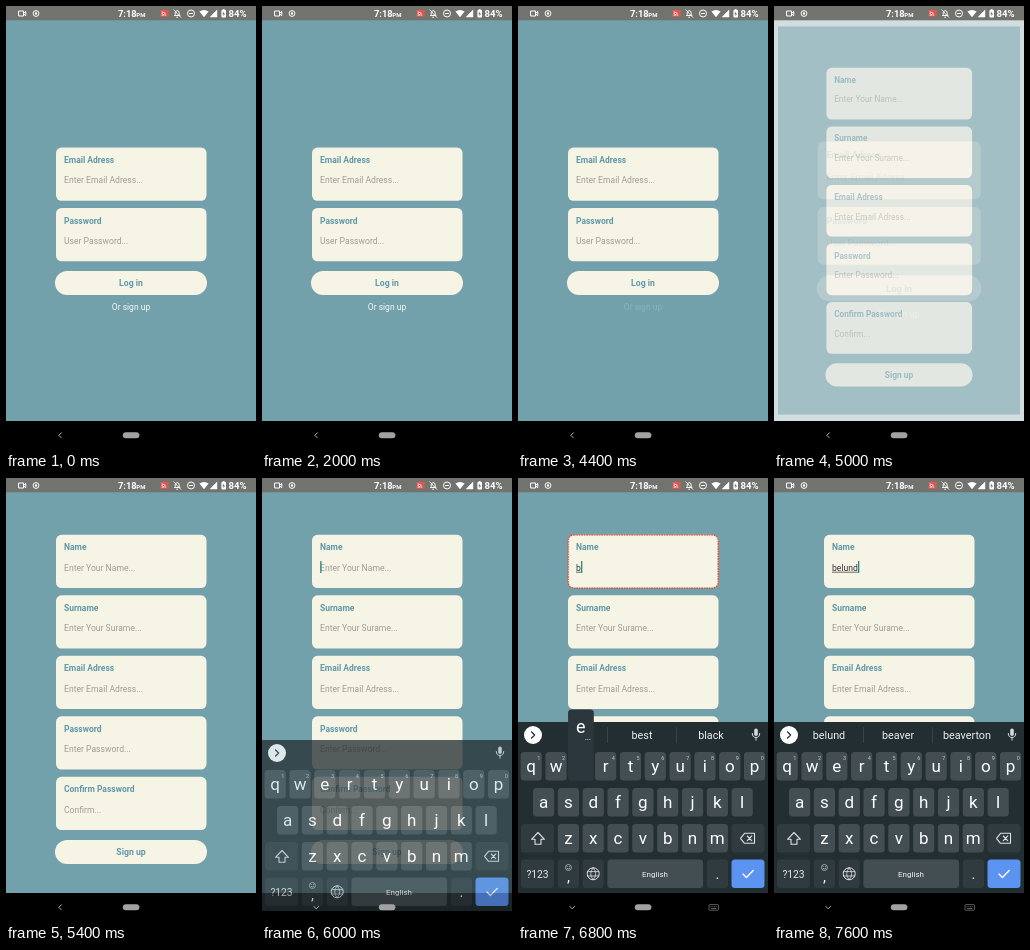
These frames come from a looping animation (250 px wide and 444 px high, 8 s). An HTML page:

```html
<!DOCTYPE html>
<html lang="en">
<head>
<meta charset="utf-8">
<title>Sign up flow</title>
<style>
  html, body { margin: 0; width: 100%; height: 100%; overflow: hidden; background: #000; }
  svg { display: block; width: 100vw; height: 100vh; font-family: Roboto, sans-serif; }
</style>
</head>
<body>
<svg id="stage" viewBox="0 0 250 444"></svg>
<script>
const LOOP = 8000, STEP = 200;
const TEAL = '#72a0ab', CREAM = '#f6f4e4', LABEL = '#6298a9', HINT = '#a09f95';
const CURSOR = '#2b8587', BOARD = '#232e32', KEY = '#434e52', DARK_KEY = '#303b3f';
const stage = document.getElementById('stage');

const rect = (x, y, w, h, fill, r = 0, extra = '') =>
  `<rect x="${x}" y="${y}" width="${w}" height="${h}" rx="${r}" fill="${fill}" ${extra}/>`;
const text = (str, x, y, size, fill, extra = '') =>
  `<text x="${x}" y="${y}" font-size="${size}" fill="${fill}" ${extra}>${str}</text>`;
const line = (d, color = '#fff', width = 1) =>
  `<path d="${d}" fill="none" stroke="${color}" stroke-width="${width}" stroke-linecap="round" stroke-linejoin="round"/>`;
const shape = (d, fill = '#fff') => `<path d="${d}" fill="${fill}"/>`;
const circle = (x, y, r, fill, extra = '') => `<circle cx="${x}" cy="${y}" r="${r}" fill="${fill}" ${extra}/>`;
const group = (content, opacity, transform = '') =>
  `<g opacity="${opacity}" transform="${transform}">${content}</g>`;
const zoom = s => `translate(125 214.5) scale(${s}) translate(-125 -214.5)`;
const MID = 'text-anchor="middle"', BOLD = 'font-weight="700"';

// --- Forms ---
const backdrop = rect(0, 14, 250, 401, TEAL);

const field = (top, label, hint) =>
  rect(50, top, 150.5, 53.3, CREAM, 5.5) +
  text(label, 58, top + 15.5, 8.5, LABEL, BOLD) +
  (hint ? text(hint, 58, top + 35.7, 8.6, HINT) : '');

const button = (top, label) =>
  rect(49, top, 152, 24, CREAM, 12) + text(label, 125, top + 15.1, 8.7, LABEL, `${BOLD} ${MID}`);

const loginScreen = linkOpacity => backdrop +
  field(141.5, 'Email Adress', 'Enter Email Adress...') +
  field(202, 'Password', 'User Password...') +
  button(265, 'Log in') +
  text('Or sign up', 125, 303.7, 8.5, '#f7f8f5', `${MID} opacity="${linkOpacity}"`);

function signupScreen({ typed = '', focused = false }) {
  const fields = [
    ['Name', typed ? '' : 'Enter Your Name...'],
    ['Surname', 'Enter Your Surame...'],
    ['Email Adress', 'Enter Email Adress...'],
    ['Password', 'Enter Password...'],
    ['Confirm Password', 'Confirm...']
  ];
  let out = backdrop + button(362, 'Sign up');
  fields.forEach(([label, hint], i) => out += field(56.8 + i * 60.5, label, hint));
  if (typed) out += text(typed, 58, 92.5, 8.6, '#333');
  const end = 58 + textWidth(typed);
  if (typed) out += rect(58, 93.8, end - 58, .7, '#333');
  if (typed && typed.length < 3) {
    out += rect(50.2, 57, 150, 53, 'none', 5.5, 'stroke="#e2422f" stroke-width="1.2" stroke-dasharray="1.8 .7"');
  }
  if (focused) out += rect(end + .2, 83, 1.3, 12, CURSOR);
  return out;
}

const ruler = document.createElement('canvas').getContext('2d');
function textWidth(str) {
  ruler.font = '86px Roboto, sans-serif';
  return ruler.measureText(str).width / 10;
}

// --- Keyboard ---
const ROWS = [['qwertyuiop', 13.2, 274], ['asdfghjkl', 25.6, 310], ['zxcvbnm', 50.4, 346]];
const PITCH = 24.82;

const keyCap = (x, y, w, fill) => rect(x, y, w, 28.5, fill, 3.5);

function popup(letter) {
  const [row, first, top] = ROWS.find(([letters]) => letters.includes(letter));
  const x = first + row.indexOf(letter) * PITCH;
  return rect(x - 12.8, top - 42.5, 25.8, 71.5, '#2b373c', 3.5) +
    text(letter, x, top - 19.5, 18, '#fff', MID) +
    [5, 7, 9].map(dx => circle(x + dx, top - 12.5, .55, '#dfe3e4')).join('');
}

function keyboard({ words = [], pressed }) {
  let out = rect(0, 244, 250, 171, BOARD);
  out += circle(15, 257, 9, '#fff') + line('M13.6 254 l3 3 -3 3', '#27343a', 1.3);
  words.forEach((word, i) => out += text(word, 55 + i * 69, 261, 10.8, '#eceff0', MID));
  if (words.length) out += rect(89, 249, .6, 16, '#465156') + rect(158.3, 249, .6, 16, '#465156');
  out += rect(236.2, 250.5, 3.6, 7.5, '#d5d9da', 1.8) + line('M234.3 255.5 a3.7 4 0 0 0 7.4 0 M238 259.6 v2.6', '#d5d9da', 1);

  for (const [letters, first, top] of ROWS) {
    [...letters].forEach((letter, i) => {
      const x = first + i * PITCH;
      out += keyCap(x - 10.6, top, 21.2, KEY) + text(letter, x, top + 19.6, 17, '#fff', MID);
      if (top === 274) out += text((i + 1) % 10, x + 7.6, 281.5, 5.5, '#c3c9cb', MID);
    });
  }
  out += keyCap(3, 346, 33, DARK_KEY) + line('M20 354.5 l-6.5 6.8 h3.5 v5 h6 v-5 h3.5 z', '#dde1e2', 1.1);
  out += keyCap(213.5, 346, 33, DARK_KEY) +
    line('M222.5 360.3 l4 -5 h10 v10 h-10 z M229.3 358 l4.4 4.6 m0 -4.6 l-4.4 4.6', '#dde1e2', 1.1);

  out += keyCap(3, 381.5, 33, DARK_KEY) + text('?123', 19.5, 399.7, 10.3, '#e4e7e8', MID);
  out += keyCap(39.8, 381.5, 21.2, DARK_KEY) + text(',', 50.4, 403.5, 15, '#fff', MID) +
    circle(50.4, 389.5, 3, 'none', 'stroke="#c3c9cb" stroke-width=".7"') +
    line('M48.9 390.3 q1.5 1.8 3 0 M49.3 388.6 v.1 M51.5 388.6 v.1', '#c3c9cb', .7);
  out += keyCap(64.6, 381.5, 21.2, DARK_KEY) + circle(75.2, 395.8, 6, 'none', 'stroke="#dde1e2"') +
    line('M69.6 393.6 h11.2 M69.6 398 h11.2 M75.2 389.8 q-5.2 6 0 12 q5.2 -6 0 -12', '#dde1e2', .8);
  out += keyCap(89.4, 381.5, 95.7, KEY) + text('English', 137, 398.8, 8, '#eef0f1', MID);
  out += keyCap(188.8, 381.5, 21.2, DARK_KEY) + text('.', 199.4, 400.5, 15, '#fff', MID);
  out += keyCap(213.5, 381.5, 33, '#5b93f0') + line('M225 396 l3.4 3.4 6.8 -7', '#fff', 1.4);
  return out + (pressed ? popup(pressed) : '');
}

// --- System bars ---
const statusBar = rect(0, 0, 250, 14.3, '#71736f') +
  line('M13 5 h4.6 v5 h-4.6 z M17.8 7.1 l2 -1.6 v4.2 l-2 -1.6') +
  circle(30, 7.5, 2.9, 'none', 'stroke="#fff"') + circle(30, 7.5, 1.2, '#fff') +
  text('7:18', 112, 10.7, 9.3, '#fff', 'font-weight="600"') +
  text('PM', 130.3, 10.7, 6, '#fff', 'font-weight="600"') +
  rect(154.5, 3.8, 8.2, 7, '#d95a50', .8) + line('M156 9.4 h.4 M156 7.6 q1.8 0 1.8 1.8 M156 5.8 q3.6 0 3.6 3.6', '#fff', .8) +
  line('M168.5 9.5 h5.4 M169.2 9.3 v-2.4 a2 2.2 0 0 1 4 0 v2.4 M167.8 3.8 l6.8 7.4 M170.7 11.2 h1', '#fff', .9) +
  circle(185, 7.5, 3.5, 'none', 'stroke="#fff"') + line('M183.4 7.5 h3.2') +
  shape('M193.4 5.6 q4.6 -3.4 9.2 0 l-4.6 5.7 z') +
  shape('M211.2 3.4 v7.8 h-7.6 z') +
  rect(215.4, 4.1, 4.6, 7.5, '#fff', .8) + rect(216.7, 3.2, 2, 1, '#fff') + shape('M218 5.4 l-1.7 2.8 h1.2 v2 l1.6 -2.8 h-1.1 z', '#71736f') +
  text('84%', 222.5, 10.8, 9.6, '#fff', 'font-weight="600"');

function navIcons(keyboardOpen, switcher) {
  let out = rect(116.8, 426.3, 16.6, 6, '#a2a2a2', 3);
  out += keyboardOpen ? line('M51.8 428.4 l2.4 2.4 2.4 -2.4', '#b5b5b5') : line('M55.3 426.8 l-2.5 2.5 2.5 2.5', '#b5b5b5');
  if (switcher) {
    out += rect(191, 426.6, 9.4, 5.6, 'none', .8, 'stroke="#858585" stroke-width=".7"') +
      line('M193 428.5 h.1 m1.7 0 h.1 m1.7 0 h.1 m1.5 0 h.1 M193.5 430.5 h4.4', '#858585', .8);
  }
  return out;
}

// --- Timeline ---
const NAME = 'belund';
const KEYSTROKES = [
  { at: 6600, count: 0, pressed: 'b', words: [] },
  { at: 6800, count: 1, pressed: 'e', words: ['b', 'best', 'black'] },
  { at: 7000, count: 2, pressed: 'l', words: ['be', 'best', 'been'] },
  { at: 7200, count: 4, pressed: 'n', words: [NAME.slice(0, 4), 'beaver', 'beaverton'] },
  { at: 7400, count: 5, pressed: 'd', words: [NAME.slice(0, 5), 'beaver', 'beaverton'] },
  { at: 7600, count: 6, words: [NAME, 'beaver', 'beaverton'] }
];

function render(t) {
  const open = t >= 6000, settled = t >= 6200;
  const stroke = KEYSTROKES.findLast(k => t >= k.at) || { count: 0 };
  let out = rect(0, 0, 250, 444, '#f2f2f2');

  if (t < 5000) {
    out += loginScreen(t < 4200 ? 1 : t < 4400 ? .45 : .2);
  } else if (t < 5200) {
    out += group(loginScreen(.6), .25, zoom(1.083)) + group(signupScreen({}), .48, zoom(.968));
  } else {
    out += signupScreen({ typed: NAME.slice(0, stroke.count), focused: t >= 5800 });
  }

  out += statusBar + rect(0, 415, 250, 29, '#000');
  if (open) out += settled ? keyboard(stroke) : group(keyboard({}), .76, 'translate(0 18)');
  stage.innerHTML = out + navIcons(open, settled);
}

let shown = -1;
const start = performance.now();
function tick() {
  const elapsed = (performance.now() - start) % LOOP;
  const t = Math.floor(elapsed / STEP) * STEP;
  if (t !== shown) render(shown = t);
  requestAnimationFrame(tick);
}
tick();
</script>
</body>
</html>
```
